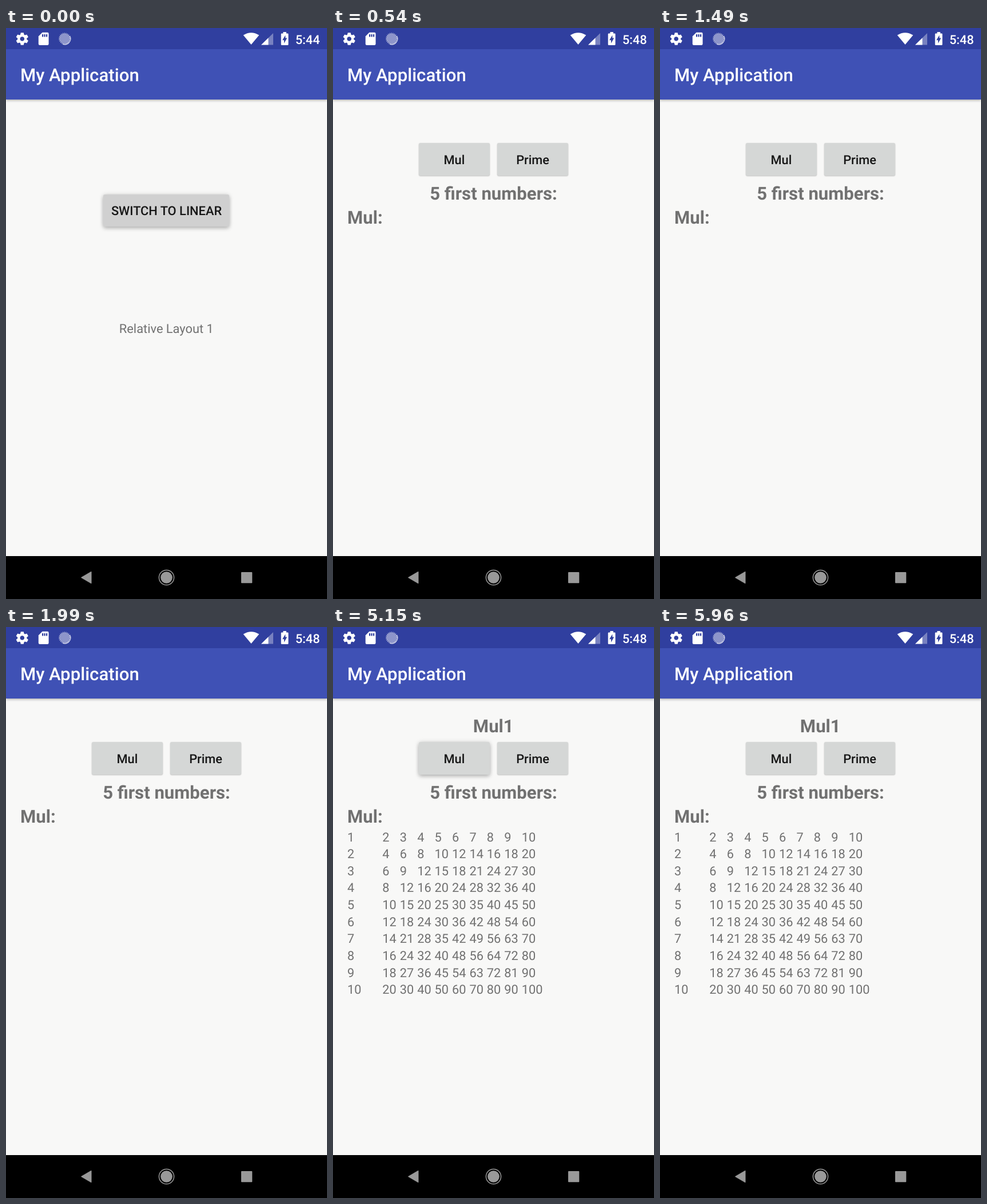
Recreate the animation shown at these times as an HTML page. Size 561x998 px, loop 8 s.

```html
<!DOCTYPE html>
<html lang="en">
<head>
<meta charset="utf-8">
<title>My Application</title>
<style>
  html, body { margin: 0; width: 100%; height: 100%; overflow: hidden; background: #f8f8f7; }
  #stage { position: relative; width: 561px; height: 998px; overflow: hidden; background: #f8f8f7; }
  #stage div, svg { position: absolute; }
  svg { left: 0; top: 0; font-family: Roboto, "Noto Sans", sans-serif; text-rendering: geometricPrecision; }
  .bar { left: 0; width: 561px; }
  .status { top: 0; height: 37.4px; background: #303f9f; }
  .tool { top: 37.4px; height: 87.3px; background: #3f51b5;
    box-shadow: 0 2px 4px rgba(0,0,0,.22), 0 0 5px rgba(0,0,0,.1); }
  .nav { top: 923px; height: 75px; background: #000; }
  .btn { border-radius: 3px; background: #d5d7d6; }
  .pad { top: 201.4px; width: 124.7px; height: 56.4px; }
  .title { font-size: 31.17px; font-weight: 500; fill: #fff; }
  .label { font-size: 21.82px; font-weight: 500; fill: #161616; text-anchor: middle; }
  .head { font-size: 31.17px; font-weight: 700; fill: #717171; }
  .body { font-size: 21.82px; fill: #717171; }
  .clock { font-size: 21.82px; font-weight: 500; fill: #fff; }
  .mid { text-anchor: middle; }
</style>
</head>
<body>
<div id="stage">
  <div class="bar tool"></div>
  <div class="bar status"></div>
  <div class="bar nav"></div>
  <div id="switch" class="btn" style="left:170.4px;top:290.6px;width:220px;height:56.6px"></div>
  <div id="mul" class="btn pad" style="left:149.6px"></div>
  <div id="prime" class="btn pad" style="left:286.8px"></div>

  <svg width="561" height="998" viewBox="0 0 561 998">
    <g fill="#fff">
      <g id="gear" transform="translate(28.3 19)">
        <circle r="5.9" fill="none" stroke="#fff" stroke-width="4.2"/>
      </g>
      <path d="M63.5 7.8H72.5Q74.6 7.8 74.6 10V27.8Q74.6 30 72.5 30H59Q56.8 30 56.8 27.8V14.4Z"/>
      <path d="M63 11h2.2v4.4H63zM66.5 11h2.2v4.4h-2.2zM70 11h2.2v4.4H70z" fill="#303f9f"/>
      <circle cx="102.5" cy="18.7" r="9" opacity=".45"/>
      <circle cx="102.5" cy="18.7" r="9.4" fill="none" stroke="#fff" stroke-width="2" stroke-dasharray="1.2 1.5" opacity=".6"/>
      <path d="M111.5 14A10 10 0 0 1 99 28" fill="none" stroke="#fff" stroke-width="1.6" opacity=".65"/>
      <path d="M428.5 29L414.7 12.6Q428.5 4 442.3 12.6Z"/>
      <path d="M446 29.5L467 9V29.5Z" opacity=".35"/>
      <path d="M446 29.5L458.5 17.3V29.5Z"/>
      <path d="M484.4 7h5.4v2.4h2.4q1.3 0 1.3 1.3V28.7q0 1.3-1.3 1.3H482q-1.3 0-1.3-1.3V10.7q0-1.3 1.3-1.3h2.4z"/>
      <path d="M488.3 12.5V17.6H491.2L486 26.8V21.2H483Z" fill="#303f9f"/>
    </g>
    <g fill="#999">
      <path d="M131.5 960.5L149 950.3V970.7Z" stroke="#999" stroke-linejoin="round"/>
      <circle cx="280.5" cy="960.5" r="10.3"/>
      <circle cx="280.5" cy="960.5" r="13.1" fill="none" stroke="#999" stroke-width="1.5"/>
      <rect x="411" y="951" width="19.3" height="19.3" rx="1"/>
    </g>
    <text class="title" x="24.9" y="93.3">My Application</text>

    <g id="first">
      <text class="clock" x="505.7" y="27.5">5:44</text>
      <text class="label" x="280.5" y="327">SWITCH TO LINEAR</text>
      <text class="body mid" x="280.3" y="532.7">Relative Layout 1</text>
    </g>
    <g id="second">
      <text class="clock" x="505.7" y="27.5">5:48</text>
      <text class="label" x="211.9" y="238">Mul</text>
      <text class="label" x="349.1" y="238">Prime</text>
      <text class="head mid" x="280.5" y="300.4">5 first numbers:</text>
      <text class="head" x="24.9" y="342.3">Mul:</text>
    </g>
    <g id="result">
      <text class="head mid" x="280.3" y="183.6">Mul1</text>
    </g>
  </svg>
</div>
<script>
const LOOP = 8000, CUT = 60, CLICK = 5150;
const $ = id => document.getElementById(id);
const NS = "http://www.w3.org/2000/svg";

function add(parent, tag, attrs, text = "") {
  const el = document.createElementNS(NS, tag);
  for (const key in attrs) el.setAttribute(key, attrs[key]);
  el.textContent = text;
  parent.append(el);
}

for (let i = 0; i < 6; i++)
  add($("gear"), "path", { d: "M-3.4 -6.5L-2.5 -10.8H2.5L3.4 -6.5Z", transform: `rotate(${i * 60})` });

for (let r = 1; r <= 10; r++)
  for (let c = 1; c <= 10; c++)
    add($("result"), "text", {
      class: "body",
      x: c === 1 ? 24.9 : 86.3 + (c - 2) * 30.42,
      y: 374.55 + (r - 1) * 29.64
    }, r * c);

// z runs from 0 (resting) to 1 (pressed)
const shadow = z =>
  `0 ${1 + 2 * z}px ${2 + 5 * z}px rgba(0,0,0,${0.2 + 0.04 * z}), 0 0 ${2 + 6 * z}px rgba(0,0,0,${0.1 + 0.02 * z})`;

function play(id, steps) {
  const frames = steps.map(([ms, style]) => ({ offset: ms / LOOP, ...style }));
  $(id).animate(frames, { duration: LOOP, iterations: Infinity });
}

function show(id, from, to) {
  const steps = [[0, { opacity: from ? 0 : 1, easing: "step-end" }]];
  if (from) steps.push([from, { opacity: 1, easing: "step-end" }]);
  if (to < LOOP) steps.push([to, { opacity: 0, easing: "step-end" }]);
  steps.push([LOOP, { opacity: to < LOOP ? 0 : 1 }]);
  play(id, steps);
}

$("switch").style.background = "#d0d0d0";
$("switch").style.boxShadow = shadow(1);
$("prime").style.boxShadow = shadow(0);

show("switch", 0, CUT);
show("first", 0, CUT);
for (const id of ["second", "mul", "prime"]) show(id, CUT, LOOP);
show("result", CLICK, LOOP);

const lift = [[0, 0], [4750, 0], [4780, 0.35], [4850, 1], [CLICK + 20, 1], [CLICK + 140, 0], [LOOP, 0]];
play("mul", lift.map(([ms, z]) => [ms, { boxShadow: shadow(z) }]));
</script>
</body>
</html>
```
